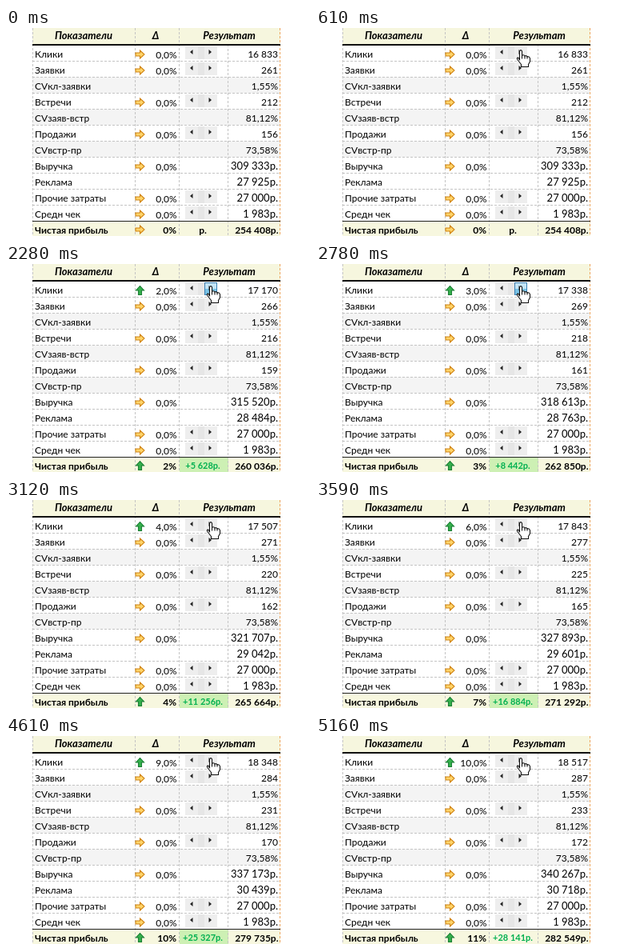
An HTML page with a canvas for the animation above (7760 ms loop, 380x260 px).

```html
<!DOCTYPE html>
<html lang="ru">
<head>
<meta charset="utf-8">
<title>Показатели</title>
<style>
html, body { margin: 0; width: 100%; height: 100%; overflow: hidden; background: #fff; }
canvas { display: block; width: 380px; height: 260px; }
</style>
</head>
<body>
<canvas id="stage" width="380" height="260"></canvas>
<script>
const ctx = document.getElementById('stage').getContext('2d');
const LOOP = 7760;
const LEFT = 33, RIGHT = 343, TOP = 21, PITCH = 20, TOTAL = 241;
const FAMILY = 'Lato, "Open Sans", "Noto Sans", sans-serif';
const PLAIN = `12px ${FAMILY}`;
const MONEY = `13px ${FAMILY}`;
const BOLD = `bold 12px ${FAMILY}`;
const GAIN = `bold 11px ${FAMILY}`;
const HEAD = `italic bold 13px ${FAMILY}`;

// moments when the percentage goes up by one, and when the button lights up
const STEPS = [1810, 2190, 2620, 2990, 3410, 3590, 3720, 3900, 4330, 4620];
const GLOWS = [1840, 2220, 2700, 3440, 3750, 3930, 4360, 4650];
// spans during which the gain cell is highlighted
const LIT = [[1810, 1990], [2190, 2960], [2990, 3220], [3410, 4170], [4330, 5160]];

const ROWS = [
  { name: 'Клики', delta: true, bar: true, value: k => group(Math.ceil(16833 * k - 1e-6)) },
  { name: 'Заявки', delta: true, bar: true, value: k => group(261 * k) },
  { name: 'CVкл-заявки', shade: true, value: () => '1,55%' },
  { name: 'Встречи', delta: true, bar: true, value: k => group(212 * k) },
  { name: 'CVзаяв-встр', shade: true, value: () => '81,12%' },
  { name: 'Продажи', delta: true, bar: true, value: k => group(156 * k) },
  { name: 'CVвстр-пр', shade: true, value: () => '73,58%' },
  { name: 'Выручка', delta: true, font: MONEY, value: k => money(income(k)) },
  { name: 'Реклама', font: MONEY, value: k => money(adCost(k)) },
  { name: 'Прочие затраты', delta: true, bar: true, font: MONEY, value: () => money(27000) },
  { name: 'Средн чек', delta: true, bar: true, font: MONEY, value: () => money(1983) },
];

const income = k => 309333.3 * k;
const adCost = k => 27925.35 * k;
const profit = k => income(k) - adCost(k) - 27000;
const group = v => String(Math.round(v)).replace(/\B(?=(\d{3})+$)/g, ' ');
const money = v => group(v) + 'р.';
const clamp = v => Math.max(0, Math.min(1, v));
const ramp = (t, from, to) => clamp((t - from) / (to - from));

function rect(x, y, w, h, color) {
  ctx.fillStyle = color;
  ctx.fillRect(x, y, w, h);
}

function text(str, x, y, align = 'left', font = PLAIN, color = '#000') {
  ctx.font = font;
  ctx.textAlign = align;
  ctx.fillStyle = color;
  ctx.fillText(str, x, y);
}

function dashed(x1, y1, x2, y2, color = '#c4c4c4') {
  ctx.strokeStyle = color;
  ctx.lineWidth = 1;
  ctx.setLineDash([3, 2]);
  ctx.beginPath();
  ctx.moveTo(x1, y1);
  ctx.lineTo(x2, y2);
  ctx.stroke();
  ctx.setLineDash([]);
}

function arrow(cx, cy, up) {
  ctx.save();
  ctx.translate(cx, cy);
  if (up) ctx.rotate(-Math.PI / 2);
  ctx.beginPath();
  ctx.moveTo(-5.5, -2);
  ctx.lineTo(0, -2);
  ctx.lineTo(0, -5);
  ctx.lineTo(5.5, 0);
  ctx.lineTo(0, 5);
  ctx.lineTo(0, 2);
  ctx.lineTo(-5.5, 2);
  ctx.closePath();
  ctx.fillStyle = up ? '#35b04c' : '#ffd46a';
  ctx.strokeStyle = up ? '#1c7f35' : '#d08312';
  ctx.lineWidth = 1.1;
  ctx.fill();
  ctx.stroke();
  ctx.restore();
}

function triangle(x, y, dir) {
  ctx.fillStyle = '#222';
  ctx.beginPath();
  ctx.moveTo(x + 2 * dir, y);
  ctx.lineTo(x - 1.5 * dir, y - 3);
  ctx.lineTo(x - 1.5 * dir, y + 3);
  ctx.fill();
}

function scrollBar(y, glow) {
  rect(224, y, 40, 16, '#e6e6e6');
  rect(224, y, 16, 16, '#eeeeee');
  rect(248, y, 16, 16, '#eeeeee');
  if (glow > 0) {
    ctx.globalAlpha = glow;
    rect(248, y, 16, 16, '#3c7fb1');
    rect(249, y + 1, 14, 7, '#c4e5f6');
    rect(249, y + 8, 14, 7, '#78c3e8');
    ctx.globalAlpha = 1;
  }
  triangle(232, y + 7, -1);
  triangle(255, y + 7, 1);
}

function hand(x, y) {
  ctx.save();
  ctx.translate(x, y);
  ctx.beginPath();
  ctx.moveTo(3.5, 13);
  ctx.lineTo(3.5, 2);
  ctx.quadraticCurveTo(5, -0.8, 6.5, 2);
  ctx.lineTo(6.5, 7.5);
  ctx.quadraticCurveTo(8.5, 5.8, 10, 8);
  ctx.quadraticCurveTo(12, 6.8, 13, 9);
  ctx.quadraticCurveTo(15.5, 8, 16.5, 11);
  ctx.lineTo(16.5, 15);
  ctx.lineTo(14.5, 18.5);
  ctx.lineTo(14.5, 21.5);
  ctx.lineTo(5.5, 21.5);
  ctx.lineTo(5.5, 18.5);
  ctx.lineTo(0.8, 12.5);
  ctx.quadraticCurveTo(-0.5, 9.5, 2, 10.3);
  ctx.closePath();
  ctx.fillStyle = '#fff';
  ctx.strokeStyle = '#111';
  ctx.lineWidth = 1.1;
  ctx.lineJoin = 'round';
  ctx.fill();
  ctx.stroke();
  ctx.beginPath();
  for (const fx of [6.5, 10, 13]) {
    ctx.moveTo(fx, 8);
    ctx.lineTo(fx, 11.5);
  }
  ctx.stroke();
  ctx.restore();
}

function drawGrid(fill) {
  const width = RIGHT - LEFT;
  rect(0, 0, 380, 260, '#fff');
  rect(LEFT, 0, width, 20, '#f6f6de');
  ROWS.forEach((row, i) => {
    if (row.shade) rect(LEFT, TOP + i * PITCH, width, PITCH, '#f4f4f4');
  });
  rect(LEFT, TOTAL, width, 19, '#f7f7df');
  if (fill > 0) {
    ctx.globalAlpha = fill;
    rect(217, TOTAL, 61, 19, '#cdf0b4');
    ctx.globalAlpha = 1;
  }
  for (let i = 1; i < ROWS.length; i++) {
    const y = TOP + i * PITCH + 0.5;
    dashed(LEFT, y, RIGHT, y);
  }
  for (const x of [LEFT, 161, 216]) dashed(x + 0.5, 0, x + 0.5, 260);
  dashed(277.5, TOP, 277.5, 260);
  dashed(RIGHT - 0.5, 0, RIGHT - 0.5, 260, '#eda45c');
  rect(LEFT, 20, width, 2, '#111');
  rect(LEFT, TOTAL, width, 1, '#222');
}

const glowAt = t => Math.max(...GLOWS.map(g =>
  ramp(t, g - 10, g + 20) * (1 - ramp(t, g + 90, g + 150))));

const fillAt = t => Math.max(...LIT.map(([from, to]) =>
  ramp(t, from, from + 60) * (1 - ramp(t, to - 90, to))));

function draw(t) {
  const n = STEPS.filter(s => t >= s).length;
  const k = 1 + n / 100;
  const gain = profit(k) - profit(1);

  drawGrid(fillAt(t));
  text('Показатели', 97, 14, 'center', HEAD);
  text('Δ', 187, 14, 'center', HEAD);
  text('Результат', 279, 14, 'center', HEAD);

  ROWS.forEach((row, i) => {
    const y = TOP + i * PITCH;
    const change = i === 0 ? n : 0;
    text(row.name, 36, y + 16);
    if (row.delta) {
      arrow(167.5, y + 12, change > 0);
      text(change + ',0%', 213.5, y + 17, 'right');
    }
    if (row.bar) scrollBar(y + 2, i === 0 ? glowAt(t) : 0);
    text(row.value(k), 340, y + 16, 'right', row.font);
  });

  text('Чистая прибыль', 36, 257, 'left', BOLD);
  arrow(167.5, 252, n > 0);
  text(Math.round(gain / profit(1) * 100) + '%', 213, 257, 'right', BOLD);
  if (n) text('+' + money(gain), 246, 256, 'center', GAIN, '#00b050');
  else text('р.', 246, 257, 'center', BOLD);
  text(money(profit(k)), 340.5, 257, 'right', BOLD);

  if (t >= 60) {
    const p = ramp(t, 30, 610);
    const rest = 1 - p * p * (3 - 2 * p);
    hand(251 + 3 * rest, 27 - 49 * rest);
  }
}

const start = performance.now();
function tick() {
  draw((performance.now() - start) % LOOP);
  requestAnimationFrame(tick);
}
tick();
</script>
</body>
</html>
```
